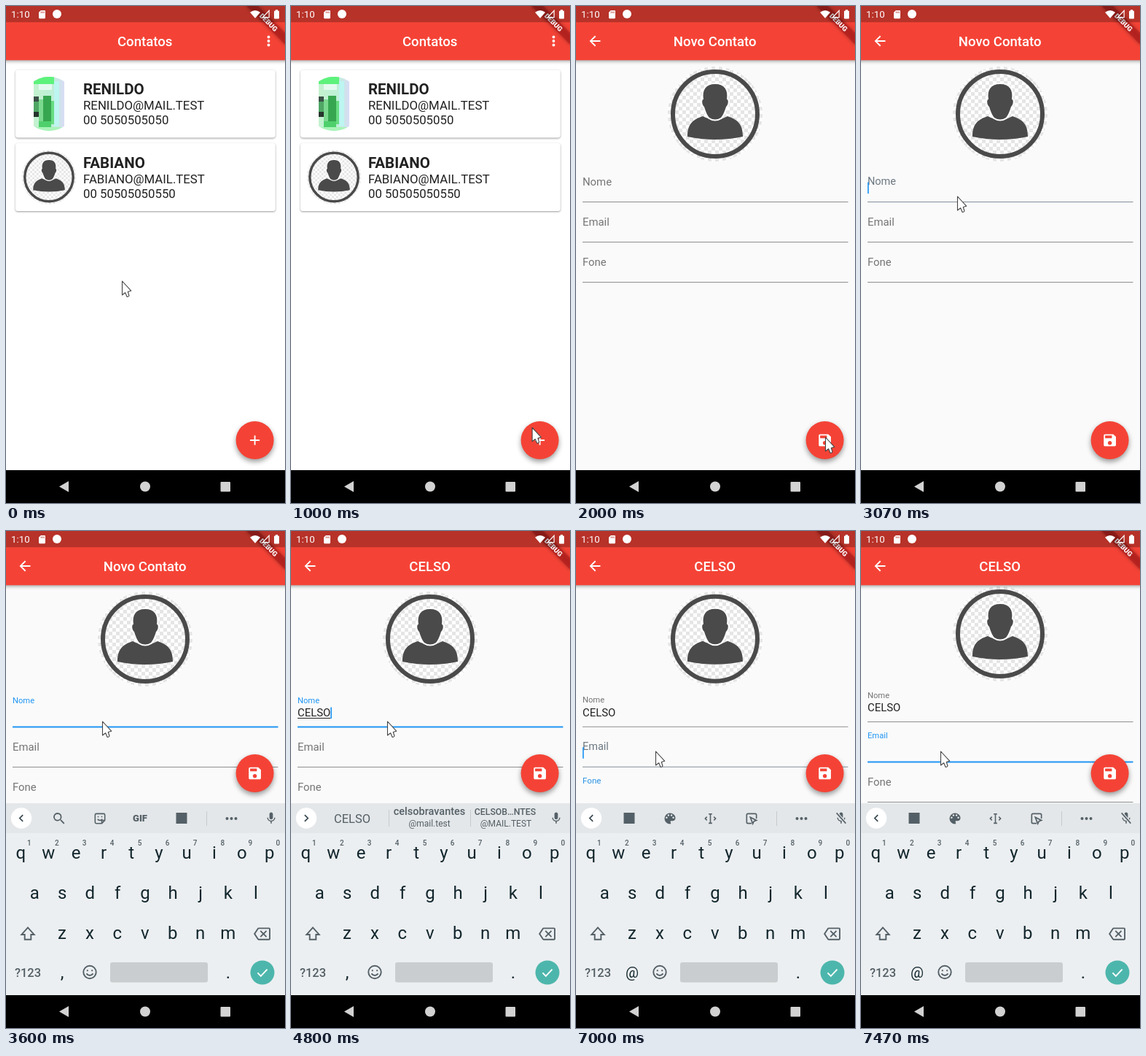
These frames come from a looping animation (383 px wide and 681 px high, 8 s). An HTML page with a canvas:

```html
<!DOCTYPE html>
<html lang="pt">
<head>
<meta charset="utf-8">
<title>Contatos</title>
<style>
html, body { margin: 0; width: 100%; height: 100%; overflow: hidden; background: #fff; }
canvas { display: block; width: 383px; height: 681px; }
</style>
</head>
<body>
<canvas id="stage"></canvas>
<script>
const W = 383, H = 681, LOOP = 8000, NAV = 636;
const RED = '#f44336', INK = '#12262d', KEY = '#546067', BLUE = [33, 150, 243];
const NAME = 'CELSO', KEY_TIMES = [4120, 4190, 4320, 4590, 4720];
const dpr = window.devicePixelRatio || 1;

function makeCanvas(el) {
  el.width = W * dpr;
  el.height = H * dpr;
  const g = el.getContext('2d');
  g.scale(dpr, dpr);
  return g;
}
const main = makeCanvas(document.getElementById('stage'));
const layer = makeCanvas(document.createElement('canvas'));
let c = main;

const ICON = {
  add: 'M19 13h-6v6h-2v-6H5v-2h6V5h2v6h6z',
  save: 'M17 3H5c-1.11 0-2 .9-2 2v14c0 1.1.89 2 2 2h14c1.1 0 2-.9 2-2V7l-4-4zm-5 16c-1.66 0-3-1.34-3-3s1.34-3 3-3 3 1.34 3 3-1.34 3-3 3zm3-10H5V5h10v4z',
  back: 'M20 11H7.83l5.59-5.59L12 4l-8 8 8 8 1.41-1.41L7.83 13H20z',
  search: 'M15.5 14h-.8l-.3-.3A6.5 6.5 0 1 0 13.7 14.4l.3.3v.8l5 5 1.5-1.5zM9.5 14a4.5 4.5 0 1 1 0-9 4.5 4.5 0 0 1 0 9z',
  mic: 'M12 14c1.66 0 3-1.34 3-3V5c0-1.66-1.34-3-3-3S9 3.34 9 5v6c0 1.66 1.34 3 3 3zm5.3-3c0 3-2.54 5.1-5.3 5.1S6.7 14 6.7 11H5c0 3.41 2.72 6.23 6 6.72V21h2v-3.28c3.28-.48 6-3.3 6-6.72z',
  palette: 'M12 3a9 9 0 0 0 0 18c.8 0 1.5-.7 1.5-1.5 0-1-.8-1.2-.8-2 0-.8.7-1.5 1.5-1.5H16c2.8 0 5-2.2 5-5 0-4.4-4-8-9-8zM5 10.500a1.5 1.5 0 1 0 3 0 1.500 1.5 0 1 0-3 0zM8 6.500a1.5 1.5 0 1 0 3 0 1.5 1.5 0 1 0-3 0zM13 6.500a1.5 1.5 0 1 0 3 0 1.5 1.5 0 1 0-3 0zM16 10.500a1.5 1.5 0 1 0 3 0 1.5 1.5 0 1 0-3 0z',
  erase: 'M22 3H7c-.69 0-1.23.35-1.59.88L0 12l5.41 8.11c.36.53.9.89 1.59.89h15c1.1 0 2-.9 2-2V5c0-1.1-.9-2-2-2zm0 16H7.07L2.4 12l4.66-7H22zm-11.59-2L14 13.41 17.59 17 19 15.59 15.41 12 19 8.41 17.59 7 14 10.59 10.41 7 9 8.41 12.59 12 9 15.59z',
  shift: 'M12 3L3 13h4.500v7h9v-7H21z',
  sticker: 'M6 4h12a2 2 0 0 1 2 2v9l-5 5H6a2 2 0 0 1-2-2V6a2 2 0 0 1 2-2zM20 15h-5v5M9 8v2M15 8v2M8 13q4 4 8 0',
  smile: 'M2.500 12a9.500 9.5 0 1 0 19 0a9.5 9.5 0 1 0-19 0M8.500 8.500v2M15.500 8.500v2M7 14q5 6 10 0',
  caret: 'M9 4h6M9 20h6M12 4v16M6 9l-3 3 3 3M18 9l3 3-3 3',
  hand: 'M12 20H6a2 2 0 0 1-2-2V6a2 2 0 0 1 2-2h12a2 2 0 0 1 2 2v6M10 10l10 5-4 1.500-2 4z',
  slash: 'M4 3L20 21',
  left: 'M14.500 7l-5 5 5 5',
  right: 'M9.500 7l5 5-5 5',
  check: 'M4.500 12.500l5 5L19.500 7',
  space: 'M2 9v5h20V9',
  wifi: 'M0 8Q12-1 24 8L12 22z',
  signal: 'M20 4v16H5z',
  card: 'M9 2h9a2 2 0 0 1 2 2v16a2 2 0 0 1-2 2H6a2 2 0 0 1-2-2V7zM9 5v4h1.500V5zM12.500 5v4H14V5zM16 5v4h1.500V5z'
};
const paths = {};
for (const k in ICON) paths[k] = new Path2D(ICON[k]);

const clamp = v => Math.max(0, Math.min(1, v));
const smooth = v => (v = clamp(v), v * v * (3 - 2 * v));
const ramp = (t, start, len) => clamp((t - start) / len);
const mix = (a, b, k) => `rgb(${a.map((v, i) => Math.round(v + (b[i] - v) * k))})`;

function rect(x, y, w, h, color, r = 0) {
  c.fillStyle = color;
  c.beginPath();
  c.roundRect(x, y, w, h, r);
  c.fill();
}
function circle(x, y, r, color) {
  c.fillStyle = color;
  c.beginPath();
  c.arc(x, y, r, 0, 7);
  c.fill();
}
function text(s, x, y, size, color, weight = 400, align = 'left') {
  c.font = `${weight} ${size}px Roboto, sans-serif`;
  c.textAlign = align;
  c.fillStyle = color;
  c.fillText(s, x, y);
}
const mid = (s, x, y, size, color, weight) => text(s, x, y, size, color, weight, 'center');

// Fills the named 24-unit icon, or strokes it when a line width is given.
function icon(name, x, y, size, color, line) {
  c.save();
  c.translate(x, y);
  c.scale(size / 24, size / 24);
  c.translate(-12, -12);
  c.fillStyle = c.strokeStyle = color;
  c.lineWidth = line;
  if (line) c.stroke(paths[name]); else c.fill(paths[name], 'evenodd');
  c.restore();
}
function shadowed(dy, blur, alpha, draw) {
  c.save();
  c.shadowColor = `rgba(0,0,0,${alpha})`;
  c.shadowOffsetY = dy * dpr;
  c.shadowBlur = blur * dpr;
  draw();
  c.restore();
}

function avatar(x, y, scale) {
  c.save();
  c.translate(x, y);
  c.scale(scale, scale);
  c.save();
  c.beginPath();
  c.arc(0, 0, 65, 0, 7);
  c.clip();
  rect(-65, -65, 130, 130, '#fff');
  for (let i = 0; i < 26; i++)
    for (let j = i % 2; j < 26; j += 2) rect(i * 5 - 65, j * 5 - 65, 5, 5, '#e5e5e5');
  c.restore();
  c.strokeStyle = '#4a4a4a';
  c.lineWidth = 6;
  c.beginPath();
  c.arc(0, 0, 58, 0, 7);
  c.stroke();
  c.fillStyle = '#4a4a4a';
  c.fill(new Path2D('M-38 31C-38 15-32 8-17 3Q0 12 17 3C32 8 38 15 38 31Q0 39-38 31z'));
  const head = new Path2D('M0-41C13-41 18-33 16-20C19-20 18-12 15-10C13-3 10 3 8 5Q0 10-8 5C-10 3-13-3-15-10C-18-12-19-20-16-20C-18-33-13-41 0-41z');
  c.strokeStyle = '#fff';
  c.lineWidth = 4;
  c.stroke(head);
  c.fill(head);
  c.restore();
}

function photo() {
  c.save();
  c.beginPath();
  c.arc(59, 134, 37.2, 0, 7);
  c.clip();
  const g = c.createLinearGradient(38, 0, 80, 0);
  g.addColorStop(0, '#c4f2cf');
  g.addColorStop(.6, '#bdf0d6');
  g.addColorStop(1, '#d9dcf6');
  rect(38, 97, 42, 75, g);
  [[38, 97, 28, 10, '#5df27c'], [45, 107, 18, 8, '#e4faf0'], [66, 103, 7, 62, '#bdf5f1'],
   [38, 124, 7, 7, '#3c5147'], [38, 131, 7, 14, '#4fa664'], [38, 145, 7, 7, '#26352d'],
   [45, 128, 6, 32, '#7bd98f'], [51, 123, 11, 43, '#37a650'], [62, 130, 4, 32, '#66dd80'],
   [45, 158, 17, 8, '#4ed06c'], [38, 166, 42, 6, '#a9f4b8']].forEach(a => rect(...a));
  c.restore();
}

function appBar(title) {
  shadowed(2, 5, .4, () => rect(-5, -10, W + 10, 84.300, RED));
  mid(title, 190.700, 55, 18.600, '#fff', 500);
}

function listPage() {
  rect(0, 0, W, NAV, '#fff');
  const people = [['RENILDO', '00 5050505050'], ['FABIANO', '00 50505050550']];
  people.forEach(([name, phone], i) => {
    const y = i * 100.600;
    shadowed(1, 2.500, .4, () => rect(13, 87.500 + y, 356.800, 93, '#fff', 3.700));
    if (i) avatar(59, 234.500, .573); else photo();
    text(name, 106, 121 + y, 20.500, '#212121', 700);
    text(name + '@MAIL.TEST', 106, 142 + y, 16.800, '#212121');
    text(phone, 106, 162 + y, 16.800, '#212121');
  });
  appBar('Contatos');
  for (const y of [42.500, 48, 53.500]) circle(360.500, y, 1.900, '#fff');
}

function field(row, label, value, focus, caretOn, composing) {
  const y = row * 55, up = value ? 1 : focus;
  text(label, 9, 246.300 + y - 10.800 * up, 14.900 - 3.700 * up, mix([117, 117, 117], BLUE, focus));
  rect(9, 268 + y - focus / 2, 364.500, 1 + focus, mix([142, 142, 142], BLUE, focus));
  text(value, 9, 254 + y, 14.900, '#212121');
  const w = c.measureText(value).width;
  if (composing && value) rect(9, 256 + y, w, 1, '#212121');
  if (caretOn) rect(9 + w, 241.500 + y, 1.700, 15.500, '#2196f3');
}

function formPage(t) {
  const name = NAME.slice(0, KEY_TIMES.filter(k => t >= k).length);
  const on = (a, b) => t >= a && t < b;
  const f = (a, b) => ramp(t, a, 200) - ramp(t, b, 200);
  const scroll = 10 * (ramp(t, 6200, 60) - smooth(ramp(t, 6320, 150))) + 7 * smooth(ramp(t, 6980, 200));
  rect(0, 0, W, H, '#fafafa');
  c.save();
  c.translate(0, -scroll);
  avatar(191, 148, 1);
  field(0, 'Nome', name, f(3050, 6180), on(3050, 3590) || on(4120, 5190) || on(5660, 6180), t < 6180);
  field(1, 'Email', '', f(6980, 9000), on(6980, 7460));
  field(2, 'Fone', '', f(6180, 6980), on(6200, 6720));
  c.restore();
  if (on(6250, 6330)) {
    c.fillStyle = '#7db9e6';
    for (let x = 0; x < W; x += 2) c.fillRect(x, 387, 1.300, 1);
  }
  appBar(name || 'Novo Contato');
  icon('back', 26, 48, 22.300, '#fff');
}

function fab(name, y) {
  shadowed(3.500, 7, .4, () => circle(341.600, y, 26, RED));
  icon(name, 341.600, y, 22.300, '#fff');
}

function enterKey(x, y) {
  circle(x, y, 16.500, '#4db6ac');
  icon('check', x, y, 21, '#fff', 2.200);
}

function strip(t) {
  rect(0, 373, W, 42, '#e4e7e9');
  const typed = NAME.slice(0, KEY_TIMES.filter(k => t >= k).length);
  const words = typed && t < 6200, email = t > 6900;
  circle(21, 393.500, 14.200, '#fff');
  icon(words ? 'right' : 'left', 21, 393.500, 21, '#37474f', 2);
  icon('mic', 364, 393.500, 19, KEY);
  if (words) {
    rect(134, 382, 1, 23, '#c5cacd');
    rect(246, 382, 1, 23, '#c5cacd');
    mid(typed, 84, 400, 16.500, KEY);
    if (t >= 4790) {
      mid('celsobravantes', 190, 389, 14.500, KEY, 500);
      mid('@mail.test', 190, 405, 12, KEY);
      mid('CELSOB…NTES', 294, 388.500, 12.300, KEY, 500);
      mid('@MAIL.TEST', 295, 405, 12, KEY);
    }
    return;
  }
  rect(email ? 65.500 : 233.500, 386, 15, 15, KEY);
  if (email) {
    icon('palette', 129, 394, 20, KEY);
    icon('caret', 184.500, 394, 19, KEY, 2);
    icon('hand', 241, 394, 20, KEY, 2);
    icon('slash', 364, 393.500, 19, '#e4e7e9', 5);
    icon('slash', 364, 393.500, 19, KEY, 2);
  } else {
    icon('search', 73, 394, 21, KEY);
    icon('sticker', 129, 394, 20, KEY, 1.900);
    mid('GIF', 184, 398, 13, KEY, 900);
  }
  rect(275, 384, 1, 20, '#c5cacd');
  for (const x of [303.500, 309.500, 315.500]) circle(x, 394, 2, KEY);
}

function letterKeys(t) {
  rect(0, 414, W, 222, '#eceff1');
  [['qwertyuiop', 20.300, 449], ['asdfghjkl', 39.300, 504], ['zxcvbnm', 77, 559]].forEach(([keys, x0, y], row) =>
    [...keys].forEach((k, i) => {
      const x = x0 + i * 37.950;
      mid(k, x, y, 24, INK);
      if (!row) mid((i + 1) % 10, x + 11.500, 430.500, 10, KEY, 500);
    }));
  icon('shift', 30, 552, 23, KEY, 2);
  icon('erase', 351.500, 552, 23, KEY);
  mid('?123', 30, 610.500, 16.500, KEY, 500);
  if (t > 6900) mid('@', 77, 612, 20, INK); else mid(',', 77, 613, 24, INK);
  icon('smile', 115, 604.500, 22, KEY, 2.100);
  rect(143, 591, 134, 27.500, '#cacdcf', 3);
  mid('.', 305, 613, 24, INK);
  enterKey(352, 605);
}

function numberKeys() {
  rect(0, 412, W, 224, '#eceff1');
  const letters = ['', 'ABC', 'DEF', 'GHI', 'JKL', 'MNO', 'PQRS', 'TUV', 'WXYZ'];
  letters.forEach((s, i) => {
    const x = 40.500 + i % 3 * 95, y = 458 + Math.floor(i / 3) * 54;
    mid(i + 1, x, y, 28, INK);
    mid(s, x + 31.500, y - 6, 12.500, '#78848a');
  });
  rect(327, 447, 12, 2, INK);
  icon('space', 333, 502, 23, KEY, 2.200);
  icon('erase', 333, 556, 23, KEY);
  mid('* #', 48.500, 617, 21, INK);
  mid('0', 135.500, 619, 28, INK);
  mid('+', 167, 617, 21, INK);
  mid('.', 238, 619, 24, INK);
  enterKey(333, 604);
}

function system() {
  c.save();
  c.translate(W, 0);
  c.rotate(Math.PI / 4);
  shadowed(0, 5, .5, () => rect(-38, 26, 76, 11.200, 'rgba(183,28,28,.63)'));
  mid('DEBUG', 0, 35.200, 9.500, '#fff', 900);
  c.restore();
  rect(0, 0, W, 22.300, 'rgba(0,0,0,.25)');
  text('1:10', 7, 16, 13.300, '#fff');
  icon('card', 49.500, 11.500, 13.500, '#fff');
  circle(70, 11, 6, '#fff');
  icon('wifi', 342, 11, 14, '#fff');
  icon('signal', 356.500, 11, 14, '#fff', 2);
  rect(368, 6.500, 7, 11, '#fff', 1);
  rect(370, 5, 3, 2, '#fff');
  rect(0, NAV, W, H - NAV, '#000');
  c.fillStyle = '#d2d2d2';
  c.fill(new Path2D('M73 658.500L86 651V666z'));
  circle(191, 658.500, 7, '#d2d2d2');
  rect(294.500, 652, 13.500, 13.500, '#d2d2d2', 1);
}

// time, x, y
const TRACK = [[0, 159.500, 377], [70, 159, 376.500], [280, 159, 376.500], [1130, 342.500, 591],
  [2030, 342.500, 591], [2400, 192, 404], [2730, 131.500, 263], [2870, 132.500, 261],
  [5620, 132.500, 261], [6000, 101.500, 324.500], [6380, 101.500, 324.500], [6730, 109.500, 302], [LOOP, 109.500, 302]];
const ARROW = new Path2D('M0 0V19L4.200 15.800L6.500 21.200Q8 22 9.500 20L7.800 14.500L12.200 13.200z');

function pointer(t) {
  const i = TRACK.findIndex(k => k[0] > t), [a, x, y] = TRACK[i - 1], [b, u, v] = TRACK[i];
  const k = smooth((t - a) / (b - a));
  c.save();
  c.translate(x + (u - x) * k, y + (v - y) * k);
  c.lineJoin = 'round';
  c.fillStyle = '#fff';
  c.strokeStyle = '#444';
  c.lineWidth = 1.100;
  c.fill(ARROW);
  c.stroke(ARROW);
  c.restore();
}

function draw(t) {
  c = main;
  const enter = ramp(t, 1700, 300);
  if (enter < 1) listPage();
  if (enter >= 1) formPage(t);
  else if (enter > 0) {
    c = layer;
    formPage(t);
    c = main;
    c.globalAlpha = enter ** 1.500;
    c.drawImage(layer.canvas, 0, 159 * (1 - smooth(enter ** .630)), W, H);
    c.globalAlpha = 1;
  }
  const digits = t >= 6230 && t < 6980;
  const top = digits ? 414 : NAV - 263 * smooth(ramp(t, 3110, 210));
  fab(enter > 0 ? 'save' : 'add', top - 41);
  if (digits) numberKeys();
  else if (top < NAV) {
    c.save();
    c.translate(0, top - 373);
    strip(t);
    letterKeys(t);
    c.restore();
  }
  system();
  pointer(t);
}

const start = performance.now();
function tick() {
  draw((performance.now() - start) % LOOP);
  requestAnimationFrame(tick);
}
tick();
</script>
</body>
</html>
```
